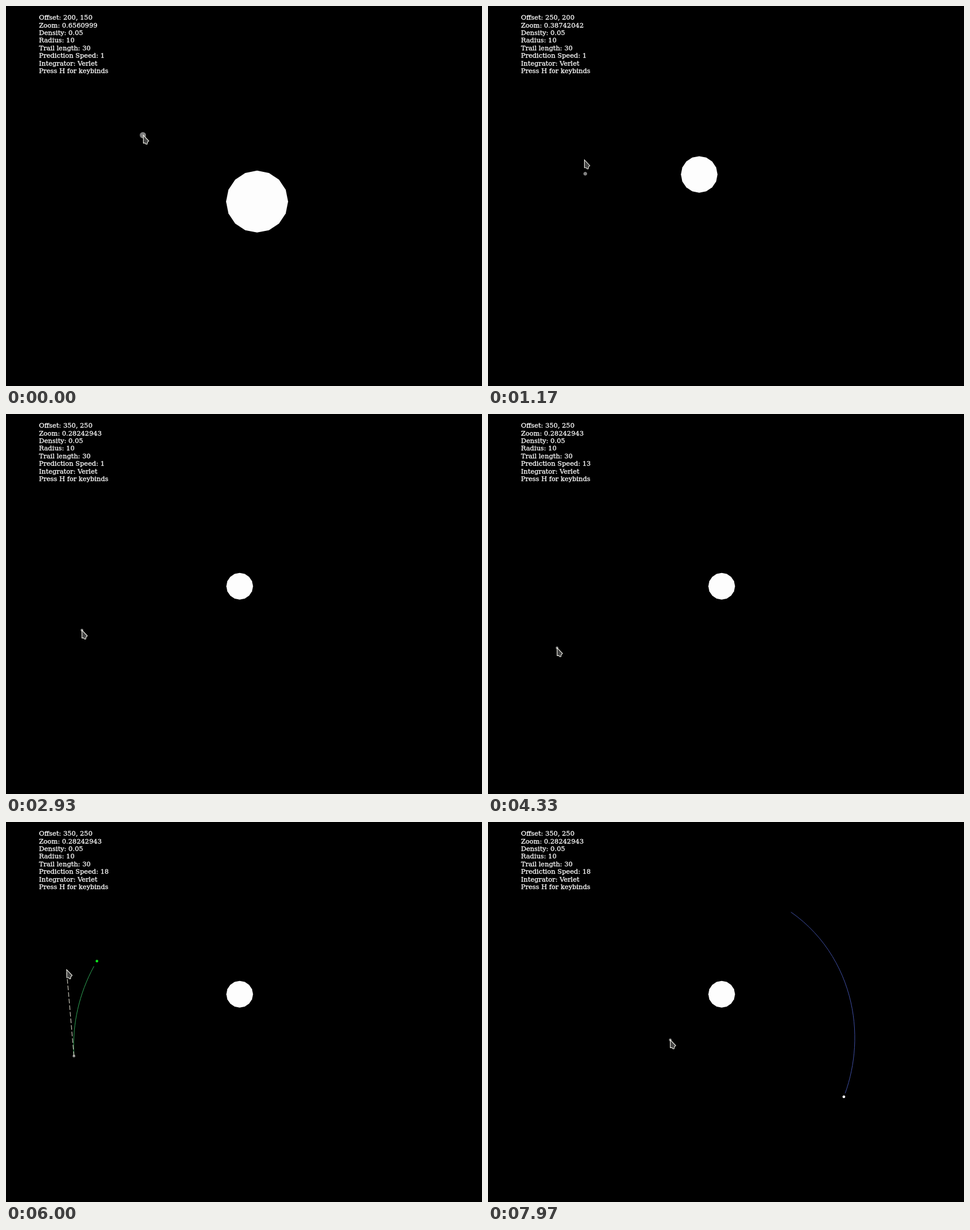
An HTML page with a canvas that plays this animation: 837x669 px, repeating every 8000 ms.

```html
<!DOCTYPE html>
<html>
<head>
<meta charset="utf-8">
<title>Orbit launcher</title>
<style>
html, body { margin: 0; width: 100%; height: 100%; overflow: hidden; background: #000; }
canvas { display: block; width: 837px; height: 669px; }
</style>
</head>
<body>
<canvas id="stage" width="837" height="669"></canvas>
<script>
const ctx = document.getElementById('stage').getContext('2d');
const LOOP = 8000, PRESS = 5010, RELEASE = 6620;
const STEPS_PER_MS = 0.06, DT = 1 / 60;
const UNIT = 0.831, GM = 9.893e7, PULL = 3.467;
const START = { x: 119.5, y: 412 };
const AIM = { x: 109, y: 260 };
const TRAIL = 30;

// Pointer stops: time, x, y
const STOPS = [
  [0, 241, 227], [1000, 166, 222], [1340, 172, 318], [2500, 150, 353],
  [2850, 133, 380], [3500, 133, 380], [4280, 121, 411], [PRESS, START.x, START.y],
  [5400, 103, 259], [5740, 103, 259], [6225, AIM.x, AIM.y],
  [6750, AIM.x, AIM.y], [7650, 320, 383], [LOOP, 320, 383]
];

const mix = (a, b, f) => a + (b - a) * f;
const smooth = f => f * f * (3 - 2 * f);
const passed = (t, ...times) => times.filter(at => t >= at).length;

function pointer(t) {
  const i = STOPS.findIndex((stop, k) => k > 0 && t <= stop[0] && t >= STOPS[k - 1][0]);
  const next = t === STOPS[i][0] && i + 1 < STOPS.length ? i + 1 : i;
  const [t0, x0, y0] = STOPS[next - 1], [t1, x1, y1] = STOPS[next];
  const f = smooth((t - t0) / (t1 - t0));
  const still = x0 === x1 && y0 === y1;
  return { x: mix(x0, x1, f), y: mix(y0, y1, f), rest: still ? t - t0 : 0 };
}

// Shortest decimal that reads back as the same 32-bit float
function floatText(value) {
  let digits = 1;
  while (Math.fround(value.toPrecision(digits)) !== value) digits++;
  return value.toPrecision(digits);
}

// Each wheel notch multiplies the zoom by 0.9, each key press pans by 50
function view(t) {
  const notches = 4 + Math.min(8, Math.floor(t / 210));
  let zoom = 1;
  for (let i = 0; i < notches; i++) zoom = Math.fround(zoom * Math.fround(0.9));
  const ox = 200 + 50 * passed(t, 350, 1850, 2200);
  const oy = 150 + 50 * passed(t, 560, 2020);
  return {
    zoom, ox, oy,
    x: UNIT * (500 * zoom + ox) + 2.7,
    y: UNIT * (400 * zoom + oy) + 1.6
  };
}

// Velocity Verlet steps of a body flung from START towards the aim point
function orbit(aim, sun, count) {
  let { x, y } = START;
  let vx = PULL * (aim.x - x + 3.5), vy = PULL * (aim.y - y);
  const accel = () => {
    const dx = sun.x - x, dy = sun.y - y;
    const g = GM / Math.max(20, Math.hypot(dx, dy)) ** 3;
    return [dx * g, dy * g];
  };
  let [ax, ay] = accel();
  const points = [{ x, y }];
  for (let i = 0; i < count; i++) {
    vx += ax * DT / 2; vy += ay * DT / 2;
    x += vx * DT; y += vy * DT;
    [ax, ay] = accel();
    vx += ax * DT / 2; vy += ay * DT / 2;
    points.push({ x, y });
  }
  return points;
}

function disc(x, y, r, color) {
  ctx.fillStyle = color;
  ctx.beginPath();
  for (let i = 0; i < 16; i++) {
    const a = i * Math.PI / 8;
    ctx.lineTo(x + r * Math.cos(a), y + r * Math.sin(a));
  }
  ctx.fill();
}

function polyline(points, color, width) {
  ctx.strokeStyle = color;
  ctx.lineWidth = width;
  ctx.beginPath();
  for (const p of points) ctx.lineTo(p.x, p.y);
  ctx.stroke();
}

function drawAim(mouse, sun, r) {
  const frames = Math.floor(mouse.rest * STEPS_PER_MS) + 1;
  const path = orbit(mouse, sun, frames * 18);
  const end = path.pop();
  const closed = path.length > 175;
  polyline(path, closed ? '#25db50' : '#2fa656', closed ? 1.5 : 1);
  disc(end.x, end.y, r, '#0be41c');
  disc(START.x, START.y, r, '#909090');

  // One dash per pixel column, as on an aliased line
  const dx = Math.abs(mouse.x - START.x);
  const period = Math.hypot(dx, mouse.y - START.y) / Math.max(dx, 1);
  ctx.setLineDash([period * 0.7, period * 0.3]);
  polyline([START, mouse], '#f2f0e0', 1);
  ctx.setLineDash([]);
}

function drawFlight(t, sun, r) {
  const now = (t - RELEASE) * STEPS_PER_MS + 0.6;
  const last = Math.floor(now);
  const path = orbit(AIM, sun, last + 1);
  polyline(path.slice(Math.max(0, last - TRAIL), last + 1), '#3f4fa4', 1);
  const a = path[last], b = path[last + 1];
  disc(mix(a.x, b.x, now - last), mix(a.y, b.y, now - last), r, '#fff');
}

function drawPointer({ x, y }) {
  const shape = [[0.5, 0.5], [10, 10.5], [7.6, 13], [7.2, 16.3], [5, 16.3], [3.8, 14.4], [0.5, 14.4]];
  ctx.beginPath();
  for (const [px, py] of shape) ctx.lineTo(x + px, y + py);
  ctx.closePath();
  ctx.fillStyle = '#444';
  ctx.fill();
  ctx.strokeStyle = '#eeeee6';
  ctx.lineWidth = 1.1;
  ctx.stroke();
}

function drawText(t, v) {
  const speed = Math.max(1, Math.min(18, 1 + Math.floor((t - 3180) / 94)));
  const lines = [
    `Offset: ${v.ox}, ${v.oy}`, `Zoom: ${floatText(v.zoom)}`, 'Density: 0.05', 'Radius: 10',
    `Trail length: ${TRAIL}`, `Prediction Speed: ${speed}`, 'Integrator: Verlet',
    'Press H for keybinds'
  ];
  ctx.font = '11.55px "DejaVu Serif", serif';
  ctx.fillStyle = ctx.strokeStyle = '#fff';
  ctx.lineWidth = 0.3;
  lines.forEach((line, i) => {
    const y = 24.2 + i * 13.4;
    ctx.fillText(line, 58, y);
    ctx.strokeText(line, 58, y);
  });
}

function draw(t) {
  ctx.fillStyle = '#000';
  ctx.fillRect(0, 0, 837, 669);
  const v = view(t), mouse = pointer(t);
  const r = 10 * UNIT * v.zoom;
  disc(v.x, v.y, r * 10, '#fdfdfd');

  if (t >= PRESS && t < RELEASE) {
    drawAim(mouse, v, r);
  } else {
    if (t >= RELEASE) drawFlight(t, v, r);
    const ghost = pointer(Math.min(t + 60, LOOP));
    disc(ghost.x + 0.5, ghost.y + 0.5, r, '#808080');
  }
  drawText(t, v);
  drawPointer(mouse);
}

const begin = performance.now();
function tick() {
  draw(Math.max(0, performance.now() - begin) % LOOP);
  requestAnimationFrame(tick);
}
tick();
</script>
</body>
</html>
```
